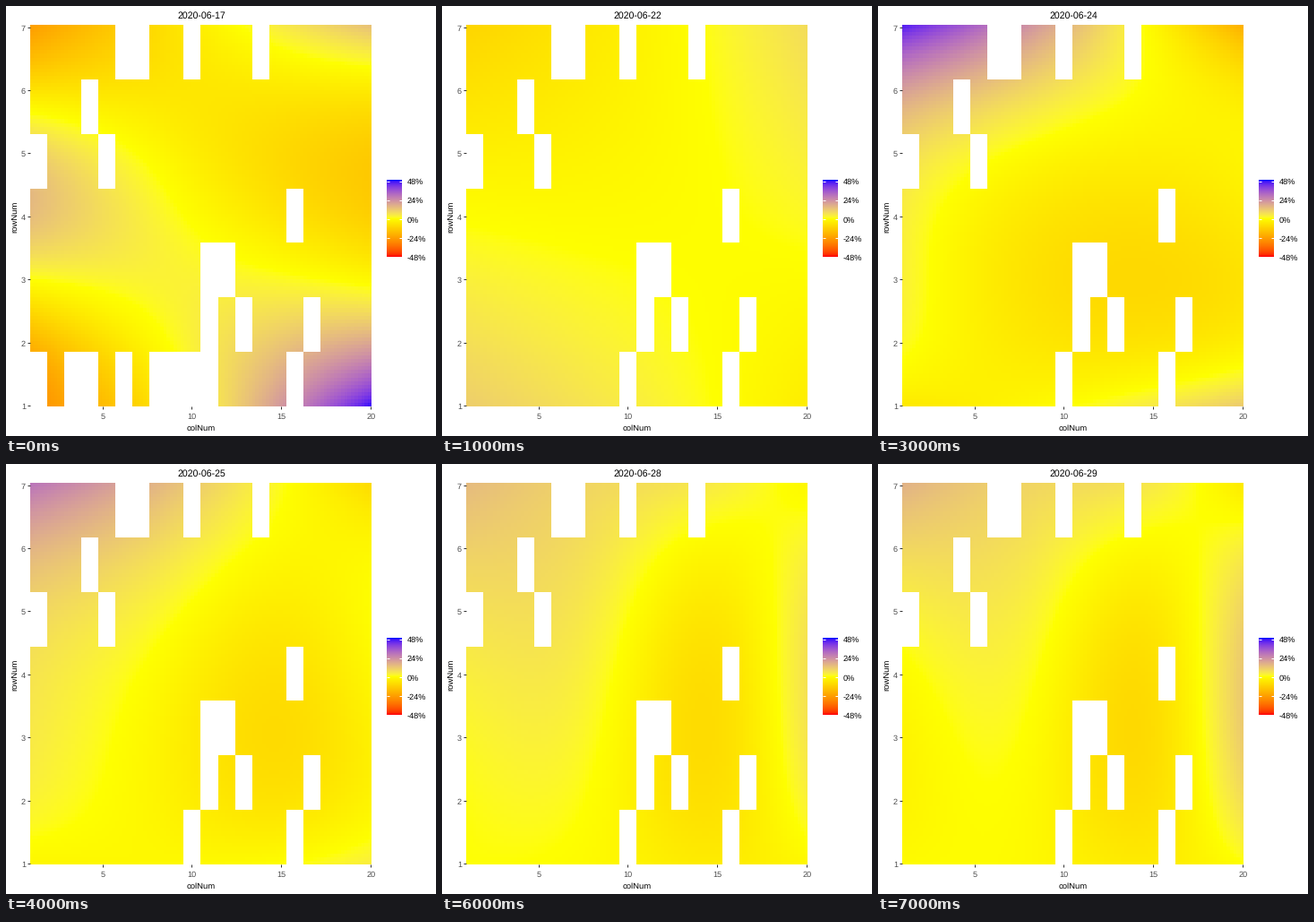
Write a matplotlib script that moves like this. It is 480 px wide and 480 px high and loops after 8 s.

```python
import numpy as np
import matplotlib.pyplot as plt
from matplotlib.animation import FuncAnimation

plt.rcParams["font.family"] = "Liberation Sans"
plt.rcParams["text.hinting"] = "none"
SIZE, DPI = 480, 100
LEFT, RIGHT, TOP, BOTTOM = 27.18, 408.18, 21.1, 447.1
COLS, ROWS = 20, 7
FINE_X, FINE_Y = 5, 15          # small tiles per plot cell
LIMIT = 48.5

# Empty cells as (row from top, columns)
HOLES = [(0, [5, 6, 9, 13]), (1, [3]), (2, [0, 4]), (3, [15]),
         (4, [10, 11]), (5, [10, 12, 16]), (6, [9, 15])]
FIRST_DAY_HOLES = [(6, [0, 2, 3, 5, 7, 8, 10])]


def centres(n):
    return (np.arange(n) + 0.5) * 2 / n - 1


# Panel coordinates from -1 to 1, x to the right and y downwards
x, y = np.meshgrid(centres(COLS * FINE_X), centres(ROWS * FINE_Y))


def bend(left, middle, right):
    """Parabola in x through the three vertical profiles."""
    return left * x * (x - 1) / 2 + middle * (1 - x * x) + right * x * (x + 1) / 2


def valley(left, right, depth):
    """Slope from left to right with a trough right of the centre."""
    slope = (left + right) / 2 + x * (right - left) / 2
    return slope - depth * np.exp(-((x - 0.45) / 0.63) ** 2)


# Percent deviation over the panel on the observed days
june17 = bend(-7 + 21.5 * np.cos(0.91 * np.pi * (y + 0.1)),
              -1.3 + 5 * np.sin(0.8 * np.pi * y),
              -12.5 + 17.5 * y + 43 * y**2)
june22 = bend(-0.5 + 10.6 * y,
              -1 + 3.5 * y + y**2,
              1.2 - 6 * y)
june23 = bend(-3 - 4 * y + 15 * y**2 + 4 * y**3,
              -6 - 11 * y + 15 * y**2,
              -11 - 3 * y + 15.5 * y**2)
june24 = bend(3.5 - 5 * y + 16.5 * y**2 - 21 * y**3,
              -7.5 - 10 * y + 14.5 * y**2 + 3 * y**3,
              -5 - 10 * y + 26 * y**3)
june27 = valley(8 - 5.5 * y - 1.2 * y**2,
                9 - 2 * y - 9 * y**2,
                17 + 1.25 * y - 14.5 * y**2)
june29 = valley(-1 - 8.5 * y + 8.5 * y**2,
                23 + 6 * y - 26 * y**2,
                25 + 7 * y - 25 * y**2)

DAYS = [(17, june17), (22, june22), (23, june23), (24, june24),
        (25, (june24 + june27) / 2), (27, june27),
        (28, (june27 + june29) / 2), (29, june29)]

RGB_TO_XYZ = np.array([[0.4124, 0.3576, 0.1805],
                       [0.2126, 0.7152, 0.0722],
                       [0.0193, 0.1192, 0.9505]])
WHITE = RGB_TO_XYZ.sum(axis=1)


def to_lab(rgb):
    # Only used for pure primaries, where gamma has no effect
    xyz = RGB_TO_XYZ @ np.array(rgb, float) / WHITE
    f = np.where(xyz > 0.008856, np.cbrt(xyz), 7.787 * xyz + 16 / 116)
    return np.array([116 * f[1] - 16, 500 * (f[0] - f[1]), 200 * (f[1] - f[2])])


def to_rgb(lab):
    fy = (lab[..., 0] + 16) / 116
    f = np.stack([fy + lab[..., 1] / 500, fy, fy - lab[..., 2] / 200], axis=-1)
    xyz = np.where(f > 0.2069, f ** 3, (f - 16 / 116) / 7.787) * WHITE
    lin = np.clip(xyz @ np.linalg.inv(RGB_TO_XYZ).T, 0, 1)
    return np.where(lin <= 0.0031308, 12.92 * lin, 1.055 * lin ** (1 / 2.4) - 0.055)


RED, YELLOW, BLUE = to_lab([1, 0, 0]), to_lab([1, 1, 0]), to_lab([0, 0, 1])


def colour(values):
    t = np.clip(values / LIMIT, -1, 1)[..., None]
    end = np.where(t < 0, RED, BLUE)
    return np.clip(to_rgb(YELLOW + (end - YELLOW) * np.abs(t)), 0, 1)


def surface(i):
    img = colour(DAYS[i][1])
    for row, cols in HOLES + (FIRST_DAY_HOLES if i == 0 else []):
        for col in cols:
            img[row * FINE_Y:(row + 1) * FINE_Y, col * FINE_X:(col + 1) * FINE_X] = 1
    return img


fig = plt.figure(figsize=(SIZE / DPI, SIZE / DPI), dpi=DPI, facecolor="white")
ax = fig.add_axes([0, 0, 1, 1])
ax.axis("off")


def label(px, py, s, size, color="black", **kw):
    return ax.text(px, py, s, fontsize=size * 72 / DPI, color=color, **kw)


def stroke(xs, ys, color):
    ax.plot(xs, ys, color=color, lw=72 / DPI, solid_capstyle="butt")


def picture(img, extent):
    return ax.imshow(img, extent=extent, aspect="auto", interpolation="nearest")


heat = picture(surface(0), (LEFT, RIGHT, BOTTOM, TOP))
title = label(218, 14.2, "", 10.56, ha="center")

# Axes
for col in range(5, COLS + 1, 5):
    px = 107.5 + (col - 5) * 19.97
    stroke([px, px], [447, 450], "#333333")
    label(px + 0.5, 460.7, str(col), 9.2, "#4d4d4d", ha="center")
for row in range(1, ROWS + 1):
    py = 446 - (row - 1) * 70.4
    stroke([24, 27], [py, py], "#333333")
    label(22, py + 4, str(row), 9.2, "#4d4d4d", ha="right")
label(218, 474, "colNum", 9.5, ha="center")
label(14.6, 235, "rowNum", 9.5, rotation=90, ha="right", va="center")

# Legend
ramp = np.linspace(LIMIT, -LIMIT, 86)[:, None]
picture(colour(ramp), (425, 442, 280, 194))
for k, pct in enumerate(range(48, -49, -24)):
    py = 195.5 + 21 * k
    for px in (425, 438.6):
        stroke([px, px + 3.4], [py, py], "white")
    label(448, 199 + 21.25 * k, f"{pct}%", 9.2)

ax.set_xlim(0, SIZE)
ax.set_ylim(SIZE, 0)


def update(i):
    heat.set_data(surface(i))
    title.set_text(f"2020-06-{DAYS[i][0]}")
    return heat, title


anim = FuncAnimation(fig, update, frames=len(DAYS), interval=1000,
                     repeat=True, repeat_delay=0)
plt.show()
```
